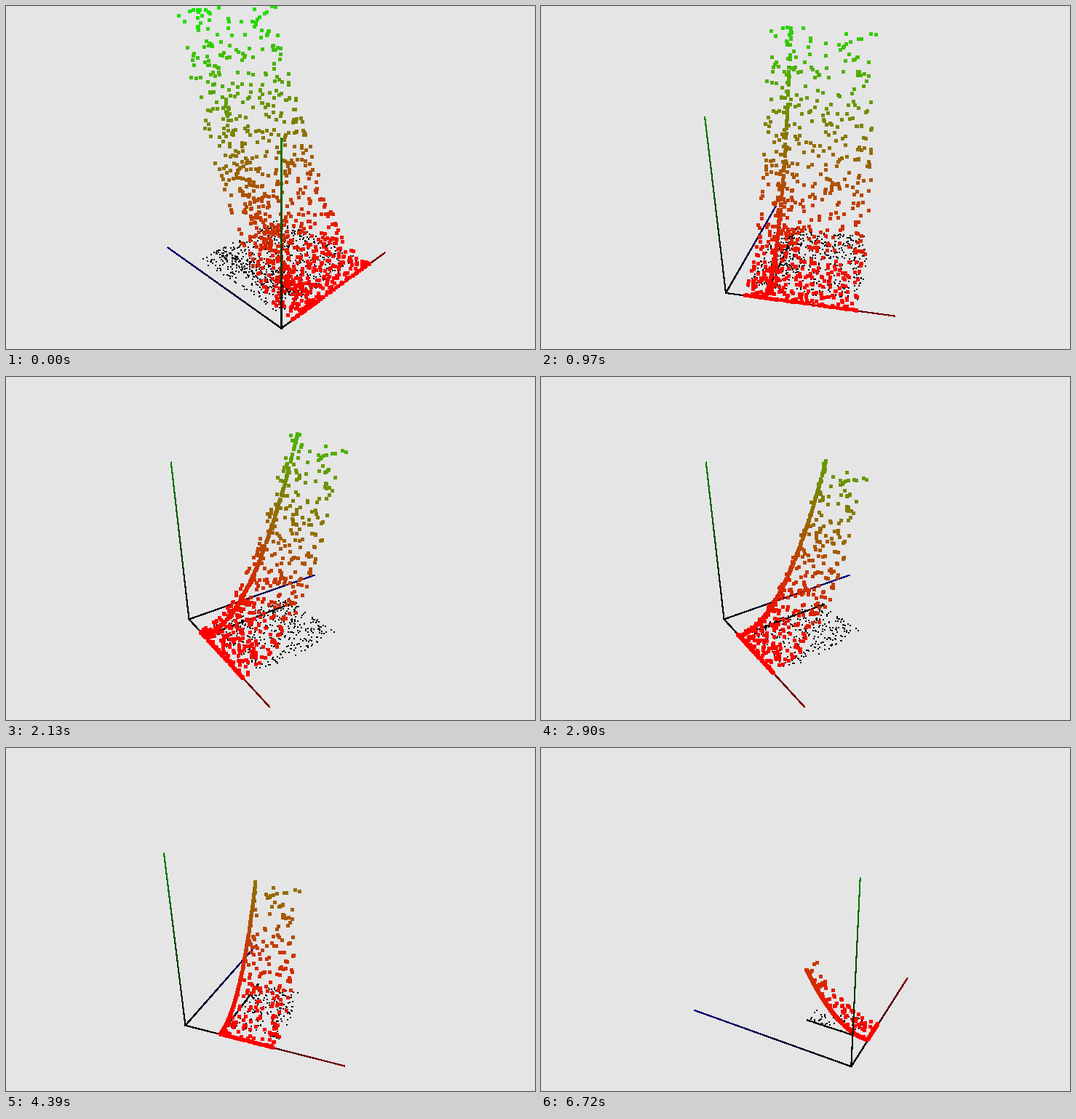
Recreate the animation shown at these times as a matplotlib script. Size 727 by 472 pixels, loop 6820 ms.

```python
import numpy as np
import matplotlib.pyplot as plt
from matplotlib.animation import FuncAnimation
from matplotlib.collections import LineCollection

W, H, DPI = 727, 472, 100
LOOP, TICK = 6820, 20
PX = 72 / DPI

# Camera: image centre, focal length, pitch, orbit centre and distance
CX, CY, FOCAL = 378, 265, 629
SIN, COS = 0.472, 0.8816
ORBIT_X, ORBIT_Z = 0.423, 0.417
DEPTH0, RISE0 = 2.798, -0.3633

X_REST = 0.224    # value of x that the cloud collapses to
CURVE = 2.47      # height = CURVE * z**2

# (first, last, count) of the evenly spaced steps, in ms
RUNS = [(150, 1090, 8), (1240, 2250, 8), (2370, 3290, 8),
        (3420, 4390, 8), (4540, 5560, 9), (5680, 6720, 8)]
STEPS = np.concatenate([[0]] + [np.linspace(*run) for run in RUNS])
LAST = len(STEPS) - 1

# Eased camera swings: start and end in ms, final yaw in degrees
YAW0 = 45.4
SWINGS = [(150, 690, -21), (690, 1090, -8), (1240, 2105, -55.1),
          (3420, 4390, -20.5), (4390, 5300, 62.5)]

rng = np.random.default_rng(11)
SPREAD, BAND = 720, 250
x_start = np.concatenate([rng.uniform(0.063, 0.763, SPREAD),
                          rng.normal(X_REST, 0.038, BAND)])
z_start = rng.uniform(0, 0.757, SPREAD + BAND)
z_start[rng.random(z_start.size) < 0.1] = 0


def camera_yaw(t):
    yaw = YAW0
    for start, end, to in SWINGS:
        k = np.clip((t - start) / (end - start), 0, 1)
        yaw += (to - yaw) * k * k * (3 - 2 * k)
    return np.radians(yaw)


def project(x, y, z, yaw):
    """Return screen x, screen y and depth."""
    c, s = np.cos(yaw), np.sin(yaw)
    dx, dz = x - ORBIT_X, z - ORBIT_Z
    right = dx * c - dz * s
    away = dx * s + dz * c
    depth = DEPTH0 + away * COS - y * SIN
    rise = RISE0 + away * SIN + y * COS
    return CX + FOCAL * right / depth, CY - FOCAL * rise / depth, depth


def shrink(v, amount):
    return np.sign(v) * np.maximum(np.abs(v) - amount, 0)


fig = plt.figure(figsize=((W + 1e-6) / DPI, (H + 1e-6) / DPI), dpi=DPI,
                 facecolor="#e5e5e5")
ax = fig.add_axes([0, 0, 1, 1])
ax.set_xlim(0, W)
ax.set_ylim(H, 0)
ax.axis("off")


def squares(size, order):
    return ax.scatter([], [], s=(size * PX) ** 2, marker="s", c="black",
                      linewidths=0, antialiased=False, zorder=order)


floor = squares(2, 2)
cloud = squares(5, 3)

# Each axis fades from black at the origin to its own colour at the tip
PARTS = 24
ramp = np.linspace(0, 1, PARTS + 1)
AXES = [((0.917, 0, 0), 0, 1), ((0, 1, 0), 1, 4), ((0, 0, 1.01), 2, 1)]
axis_lines = []
for tip, channel, order in AXES:
    tones = np.zeros((PARTS, 3))
    tones[:, channel] = 0.5 * ramp[1:]
    line = LineCollection([], colors=tones, linewidths=1.1 * PX,
                          antialiaseds=False, capstyle="projecting",
                          zorder=order)
    ax.add_collection(line)
    axis_lines.append(line)


def draw(i):
    t = i * TICK + TICK / 2
    step = np.searchsorted(STEPS, t + 1e-6) - 1
    yaw = camera_yaw(STEPS[step])
    amount = 0.383 * (step / LAST) ** 1.27

    for line, (tip, _, _) in zip(axis_lines, AXES):
        u, v, _ = project(*(ramp * k for k in tip), yaw)
        pts = np.column_stack([u + 0.5, v + 0.5])
        line.set_segments(np.stack([pts[:-1], pts[1:]], axis=1))

    x = X_REST + shrink(x_start - X_REST, amount)
    z = shrink(z_start, amount)
    y = CURVE * z ** 2

    u, v, _ = project(x, 0 * y, z, yaw)
    floor.set_offsets(np.round(np.column_stack([u, v])))

    u, v, depth = project(x, y, z, yaw)
    far_first = np.argsort(-depth)
    green = np.clip(0.64 * y, 0, 1)
    tones = np.column_stack([1 - green, green, 0 * green])
    cloud.set_offsets(np.floor(np.column_stack([u, v]))[far_first] + 0.5)
    cloud.set_facecolor(tones[far_first])
    return [floor, cloud, *axis_lines]


anim = FuncAnimation(fig, draw, frames=LOOP // TICK, interval=TICK,
                     repeat=True, repeat_delay=0, blit=False)
plt.show()
```
